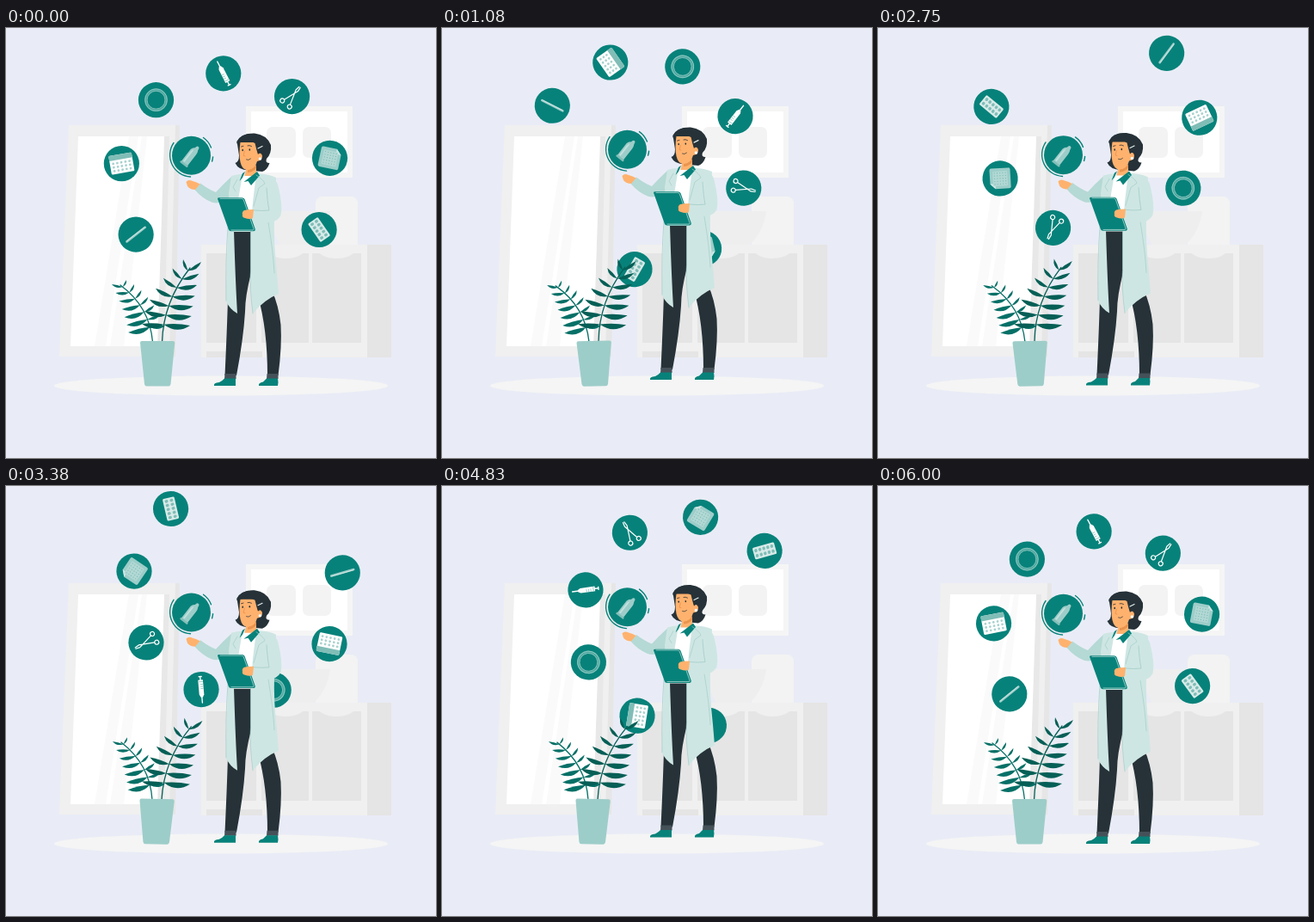
Write an HTML page that moves like this. It is 500 by 500 pixels and loops after 6.04 s.

```html
<!DOCTYPE html>
<html lang="en">
<head>
<meta charset="utf-8">
<title>Health adviser</title>
<style>
  html, body { margin: 0; width: 100%; height: 100%; overflow: hidden; background: #e9ecf6; }
  svg { display: block; width: 100vw; height: 100vh; }
  .teal { fill: #07827a; }
  .pale { fill: #9dcdc9; }
  .dark { fill: #263238; }
  .skin { fill: #ffb26e; }
  .coat { fill: #cee6e3; }
  .white { fill: #fff; }
  .line { fill: none; stroke-linecap: round; stroke-linejoin: round; }
</style>
</head>
<body>
<svg viewBox="0 0 500 500">
  <ellipse cx="250" cy="416" rx="194" ry="11.5" fill="#f5f5f5"/>

  <g id="mirror">
    <path fill="#e6e6e6" d="M184 113H202L197 382H180Z"/>
    <path fill="#f0f0f0" d="M73 113H197L190 382H62Z"/>
    <path fill="#e8e8e8" d="M184 126H190L184 370H176Z"/>
    <path class="white" d="M84 126H184L176 370H75Z"/>
    <path fill="#fafafa" d="M143 126H154L116 370H103ZM158 126H164L137 370H121Z"/>
  </g>

  <g id="picture">
    <path fill="#f5f5f5" d="M279 91H403V174H279Z"/>
    <path class="white" d="M285 97H397V168H285Z"/>
    <g fill="#f3f3f3">
      <rect x="303" y="115" width="34" height="36" rx="7"/>
      <rect x="345" y="115" width="33" height="36" rx="7"/>
    </g>
  </g>

  <g id="cabinet">
    <rect x="360" y="196" width="49" height="62" rx="8" fill="#f3f3f3"/>
    <path fill="#eeeeef" d="M300 213H377Q374 236 358 252H318Z"/>
    <path fill="#f0f0f0" d="M227 252H420V383H227Z"/>
    <path fill="#e5e5e5" d="M420 252H448V383H420ZM233 262H291V366H233ZM297 262H352V366H297ZM356 262H413V366H356ZM233 376H298V383H233Z"/>
    <path fill="#f0f0f0" d="M358 252H411Q405 268 384 268Q364 268 358 252ZM300 252H352Q346 268 325 268Q305 268 300 252Z"/>
  </g>

  <g id="orbit"></g>

  <g id="woman">
    <g id="badge">
      <circle class="teal" cx="215.5" cy="148.2" r="22.5"/>
      <path class="line" stroke="#07827a" stroke-width="1.4" d="M195 133.5A25.3 25.3 0 0 0 214.5 173M229.5 127.5A25.3 25.3 0 0 1 238.5 139M240.6 150A25.3 25.3 0 0 1 239.6 155"/>
      <g transform="translate(214.5 148.5) rotate(38)">
        <path class="pale" d="M-4.5 12V-6Q-4 -9 -1.5 -10.500Q-1.200 -14 .8 -14T3 -10.500Q4.500 -8 4.500 -5V12Z"/>
        <path fill="#c4e2df" d="M-2.800 10V-4Q-2.600 -7 -1 -8V10Z"/>
        <rect x="-5.500" y="11" width="11" height="2.500" rx="1.200" fill="#83beb9"/>
      </g>
    </g>

    <g id="legs">
      <path class="dark" d="M293 312Q304 350 304 404H316.500Q321 370 319.500 345Q317 322 309 305L290 285Z"/>
      <path class="dark" d="M264 232H286L285 285Q278 312 278 330Q276 362 268 404H254.500Q257 350 258 315Z"/>
      <path fill="#455158" d="M254.500 402H267.500V408H254ZM303.500 402H316.500V408H303Z"/>
      <path class="teal" d="M254 407.500H267V416H242Q241 412.500 248 412Q252 410 254 407.500ZM303 407.500H316Q317 412 316 416H294Q293 412.500 299 411.500Z"/>
    </g>

    <g id="head">
      <path class="dark" d="M271 148Q271 156 266.500 157Q270 165 282 165.500L298 167Q304 165 306.500 157Q301 157 303 152Q309 146 308 136Q303 124 289 122.500Q274 122 268.500 132Z"/>
      <path class="skin" d="M280 160H291V176L284 184L277 174Z"/>
      <path fill="#e9954f" d="M281 165Q287 164 291 159V163Q287 168 281 168Z"/>
      <path class="skin" d="M272.500 133Q270.500 146 272.500 156Q274.500 165 281 165Q290 164 292 155Q298 154 298 149Q297 144 293 146L291 133Z"/>
      <path class="dark" d="M268.500 134.500Q273 131.500 280 132Q286 131.500 289.500 134Q291 141 293 147Q295 144 298 146Q301 141 304 137Q300 126 288 123Q273 122 268.500 132Z"/>
      <g class="line" stroke="#263238" stroke-width=".8">
        <path d="M273.500 138L276 137.300M281 136.800Q283 136 285.500 137.500"/>
        <path d="M279.500 153Q282 154.500 284.500 152" stroke-width=".7"/>
        <path d="M277.500 143L276 148.500L278 149" stroke="#e88a45" stroke-width=".7"/>
      </g>
      <ellipse class="dark" cx="275.200" cy="142" rx=".8" ry="1.200"/>
      <ellipse class="dark" cx="283.300" cy="141.500" rx=".8" ry="1.200"/>
      <circle class="white" cx="295.500" cy="152" r="1.800"/>
      <path class="line" stroke="#e3efee" stroke-width="1.200" d="M293 140L298 137.500"/>
    </g>

    <g id="body">
      <path fill="#b5d9d5" d="M219.500 188L226 180.500Q236 188 244 191Q252 182 262 173L272 171L269 190Q261 197 251 202Q245 204.500 239 202.500Q228 198 219.500 188Z"/>
      <path class="skin" d="M209.500 179Q212 175.500 217 178Q222 179 225.500 181.500L220 188Q214 188 211 184Z"/>
      <path class="white" d="M271 172H294L292 237H264Z"/>
      <path class="coat" d="M262 172Q268 170 275 170L270 200L265 236Q267 300 269 332Q260 327 255.500 317Q257 270 258 228Q260 205 259 192Z"/>
      <path class="coat" d="M291 170Q303 169 314 174L312 222Q311 250 315 285L317 309Q300 316 287 332Q283 300 284.500 282V236L287 202Z"/>
      <path class="teal" d="M275 169L278 167L275 174L271.500 178ZM292 167L295 171.500L285 183L281.500 178L276.500 179L283 174Z"/>
      <path class="line" stroke="#a4cdc9" stroke-width=".7" d="M284.500 236V282Q283 300 287 332M291 171Q300 177 301 181L294 186L288 207M269 176L264 185L267 190M305 226Q311 262 312 285M258 232Q255 270 256 317"/>
      <path class="teal" d="M246 198.500Q246 197.200 248 197.200H274Q276.500 197.200 277.500 199L289.800 234Q290 236.300 288 236.300H261.500Q259.500 236.300 258.800 234.300Z"/>
      <path class="line" stroke="#b4d8d4" stroke-width=".8" d="M249 198.300H273.500Q275.500 198.300 276.300 200L288 233.500Q288.300 235 287 235H262"/>
      <path class="coat" d="M302 174Q315 173 317 186Q322 207 319.500 218Q315 226 305 226Q296 225 286 222.500L287 212Q298 213 306 212Q303 195 302 174Z"/>
      <path class="line" stroke="#9dc9c5" stroke-width=".7" d="M303 186Q304 202 306 212Q298 213 288 212"/>
      <path class="skin" d="M288 211Q281 211 277 212Q274 214 275 217Q274 220 278 221Q283 223 287 221Z"/>
    </g>
  </g>

  <g id="plant">
    <g id="fronds"></g>
    <path class="pale" d="M156 366Q156 364 158 364H194Q196.500 364 196.300 366L191.500 414Q191 416.500 189 416.500H163.500Q161.500 416.500 161 414Z"/>
  </g>
</svg>

<script>
const $ = id => document.getElementById(id);
const grid = (cols, rows, draw) =>
  Array.from({ length: cols * rows }, (_, i) => draw(i % cols, Math.floor(i / cols))).join('');
const dots = (cols, rows, x, y, dx, dy, r, fill) =>
  grid(cols, rows, (c, n) => `<circle cx="${x + c * dx}" cy="${y + n * dy}" r="${r}" fill="${fill}"/>`);
const tilt = (deg, art) => `<g transform="rotate(${deg})">${art}</g>`;

// Icons in clockwise order, one every 40 degrees
const icons = [
  // swab
  tilt(-38, `<path class="line" stroke="#9dcdc9" stroke-width="2.6" d="M-13.500 0H13.500"/>
    <path class="line" stroke="#d5eae8" stroke-width=".8" d="M-13 -.5H13"/>`),
  // calendar
  tilt(-10, `<rect x="-13.500" y="-11" width="27" height="22" rx="1.500" class="white"/>
    <path fill="#80bdb7" d="M-13.500 -5V-9.500Q-13.500 -11 -12 -11H12Q13.500 -11 13.500 -9.500V-5Z"/>` +
    dots(5, 3, -9.6, -1.4, 4.8, 4.3, 1.4, '#a9d2ce')),
  // ring
  `<circle r="11.800" fill="none" stroke="#4fa8a0" stroke-width="3.2"/>
   <circle r="12.800" fill="none" stroke="#91c9c4" stroke-width=".9"/>
   <circle r="10.400" fill="none" stroke="#91c9c4" stroke-width=".7"/>`,
  // syringe
  tilt(-117, `<path class="line" stroke="#fff" stroke-width="1.400" d="M8 0H15.500M-15 -1.500V1.500M-15 0H-10"/>
    <path class="white" d="M-11 -2.800H6L9 -1.200V1.200L6 2.800H-11Z"/>
    <path fill="none" stroke="#8dc4bf" stroke-width=".8" d="M-9 -2.800V2.800M-6 -2.800V.5M-3.500 -2.800V.5M-1 -2.800V.5"/>`),
  // scissors
  tilt(-50, `<g class="line" stroke="#fff" stroke-width="1.200">
    <circle cx="-11" cy="-5.500" r="2.500"/><circle cx="-11" cy="5.500" r="2.500"/>
    <path d="M-8.700 -4.500L9 1.500L14 .8M-8.700 4.500L9 -1.500L14 -.8"/></g>`),
  // patch
  tilt(12, `<path class="pale" d="M-10 -12H6L12 -6V10Q12 12 10 12H-10Q-12 12 -12 10V-10Q-12 -12 -10 -12Z"/>
    <path fill="#d3e9e7" d="M6 -12L12 -6H7Q6 -6 6 -7Z"/>
    <rect x="-8.500" y="-8.500" width="17" height="17" rx="1" fill="#b2d8d4"/>` +
    dots(5, 5, -6.4, -6.4, 3.2, 3.2, .65, '#7dbcb6')),
  // blister pack
  tilt(55, `<rect x="-13" y="-7" width="26" height="14" rx="1.500" fill="#d8ebe9"/>` +
    grid(5, 2, (c, n) => `<rect x="${c * 4.8 - 11.4}" y="${n * 6 - 5}" width="3.400" height="4" rx="1.700" fill="#7fbdb7"/>`))
];

$('orbit').innerHTML = icons.map((art, i) => {
  const a = (148.5 + i * 40) * Math.PI / 180;
  const x = 256 + 123 * Math.cos(a), y = 175.8 + 123 * Math.sin(a);
  return `<g transform="translate(${x} ${y})"><circle class="teal" r="20.600"/>${art}</g>`;
}).join('');

// Point on a quadratic curve
const along = ([p, q, r], u) =>
  [0, 1].map(k => (1 - u) ** 2 * p[k] + 2 * u * (1 - u) * q[k] + u * u * r[k]);

// Crescent from base to tip with its belly on one side
function leaf([x, y], [tx, ty], side) {
  const control = bulge =>
    `${(x + tx) / 2 - (ty - y) * side * bulge} ${(y + ty) / 2 + (tx - x) * side * bulge}`;
  return `<path d="M${x} ${y}Q${control(.36)} ${tx} ${ty}Q${control(-.08)} ${x} ${y}Z"/>`;
}

// Leaf tips follow their own curves on either side of the stem
function frond(stem, left, right, count, fill) {
  let leaves = '';
  for (let i = 0; i < count; i++) {
    const u = i / (count - 1), base = along(stem, .22 + .74 * u);
    leaves += leaf(base, along(left, u), -1) + leaf(base, along(right, u), 1);
  }
  return `<g fill="${fill}"><path class="line" stroke="${fill}" stroke-width="1.3" d="M${stem[0]}Q${stem[1]} ${stem[2]}"/>${leaves}</g>`;
}
$('fronds').innerHTML =
  frond([[170.5, 365], [167, 324], [133, 299]],
        [[142, 354], [137, 328], [123, 298]],
        [[185, 346], [168, 306], [140, 293]], 7, '#067067') +
  frond([[181.5, 365], [183, 318], [214, 279]],
        [[158, 344], [166, 299], [206, 269]],
        [[214, 346], [219, 314], [227, 272]], 7, '#055f56');

// Everything moves on one 24 fps stepped clock
const LOOP = 6040, STEP = 1000 / 24, start = performance.now();
function draw() {
  const now = (performance.now() - start) % LOOP;
  const t = Math.floor((now + 5) / STEP) * STEP;
  const wave = period => 2 * Math.PI * t / period;
  const bob = -4.2 * (1 - Math.cos(wave(3000)));
  $('orbit').setAttribute('transform', `rotate(${t * .05983} 257.7 147.2)`);
  $('woman').setAttribute('transform', `translate(0 ${bob})`);
  $('plant').setAttribute('transform', `rotate(${1.2 * Math.sin(wave(1500))} 176 340)`);
  requestAnimationFrame(draw);
}
draw();
</script>
</body>
</html>
```
